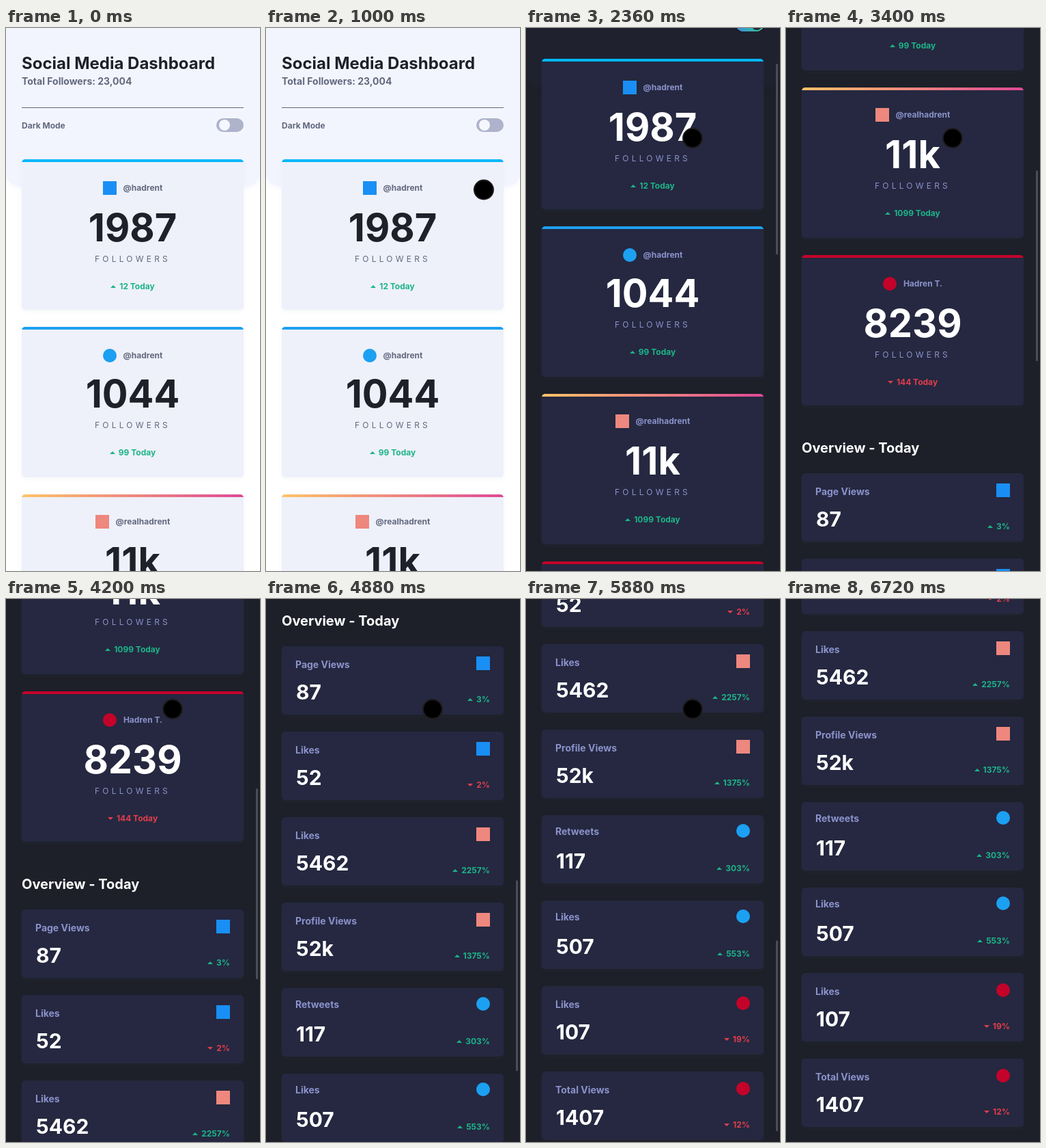
These frames come from a looping animation (372 px wide and 794 px high, 7200 ms). An HTML page:

```html
<!DOCTYPE html>
<html lang="en">
<head>
<meta charset="utf-8">
<title>Social Media Dashboard</title>
<style>
html, body { margin: 0; width: 100%; height: 100%; overflow: hidden; }
body { position: relative; background: var(--bg); font: 700 12px/20px Inter, sans-serif; color: var(--text); }
#page { position: absolute; top: 0; left: 0; width: 372px; height: 2243px; }
#page div, #page header, #cursor, #bar { position: absolute; box-sizing: border-box; }
header { width: 372px; height: 231px; border-radius: 0 0 20px 20px; background: var(--top); box-shadow: 0 2px 8px var(--top); }
#page .row { height: 20px; margin-top: -10px; display: flex; align-items: center; white-space: nowrap; }
.mid { left: 0; right: 0; justify-content: center; }
.strong { color: var(--strong); }
.up { color: #1db489; }
.down { color: #e23d4c; }
.row svg { width: 8px; height: 4px; margin-right: 5px; fill: currentColor; }
.down svg { transform: scaleY(-1); }
.card { left: 23px; width: 325px; border-radius: 5px; background: var(--card); box-shadow: 0 2px 6px rgba(90, 100, 150, .06); overflow: hidden; }
.stripe { top: 0; width: 100%; height: 4px; }
.row i { width: 20px; height: 20px; flex: none; }
.handle i { margin-right: 10px; }
.round { border-radius: 50%; }
.big { font-size: 56px; }
.spaced { font-weight: 400; letter-spacing: .35em; }
#line { left: 23px; top: 116px; width: 325px; height: 1px; background: var(--text); }
#toggle, #lit { width: 40px; height: 20px; border-radius: 10px; }
#toggle { left: 308px; top: 132px; background: #aeb3cb; }
#lit { background: linear-gradient(90deg, #378fe6, #35c884); }
#knob { left: 3.5px; top: 2px; width: 16px; height: 16px; border-radius: 50%; background: var(--knob); }
#cursor { left: -15px; top: -15px; width: 30px; height: 30px; border-radius: 50%; background: #000; border: 2px solid #1f1c1c; }
#bar { left: 366px; top: 1px; width: 3px; height: 279px; border-radius: 2px; background: #4b4d58; }
</style>
</head>
<body>
<div id="page">
  <header></header>
  <div class="row strong" style="left:23px;top:52px;font-size:24px">Social Media Dashboard</div>
  <div class="row" style="left:23px;top:78px;font-size:14px">Total Followers: 23,004</div>
  <div id="line"></div>
  <div class="row" style="left:23px;top:143px">Dark Mode</div>
  <div id="toggle"><div id="lit"></div><div id="knob"></div></div>
  <div class="row strong" style="left:23px;top:1209px;font-size:20px">Overview - Today</div>
</div>
<div id="bar"></div>
<div id="cursor"></div>
<script>
const $ = id => document.getElementById(id);
const LOOP = 7200;

// Plain shapes stand for the networks: [colour, class, stripe]
const nets = {
  f: ['#198ff5', '', '#00b7fa'],
  t: ['#1ca0f2', 'round', '#1ca0f2'],
  i: ['#ee877e', '', 'linear-gradient(90deg, #fdc468, #df4996)'],
  y: ['#c4032a', 'round', '#c4032a']
};
const icon = net => `<i class="${nets[net][1]}" style="background:${nets[net][0]}"></i>`;
const row = (y, cls, html, style = '') =>
  `<div class="row ${cls}" style="top:${y}px;${style}">${html}</div>`;
const change = (y, cls, n, text, style) => row(y, cls + (n < 0 ? ' down' : ' up'),
  `<svg viewBox="0 0 8 4"><path d="M0 4l4-4 4 4z"/></svg>${Math.abs(n)}${text}`, style);
const card = (y, h, html) => $('page').insertAdjacentHTML('beforeend',
  `<div class="card" style="top:${y}px;height:${h}px">${html}</div>`);

// network, handle, handle y, followers, change, shift of the lower rows
[['f', '@hadrent', 42, '1987', 12, 0],
 ['t', '@hadrent', 41.5, '1044', 99, -2],
 ['i', '@realhadrent', 40, '11k', 1099, -2],
 ['y', 'Hadren T.', 42, '8239', -144, 0]
].forEach(([net, name, y, count, n, dy], k) => card(192 + 245 * k, 220,
  `<div class="stripe" style="background:${nets[net][2]}"></div>` +
  row(y, 'mid handle', icon(net) + name) +
  row(100 + dy, 'mid strong big', count) +
  row(146 + dy, 'mid spaced', 'FOLLOWERS') +
  change(186 + dy, 'mid', n, ' Today')));

[['f', 'Page Views', '87', 3], ['f', 'Likes', '52', -2],
 ['i', 'Likes', '5462', 2257], ['i', 'Profile Views', '52k', 1375],
 ['t', 'Retweets', '117', 303], ['t', 'Likes', '507', 553],
 ['y', 'Likes', '107', -19], ['y', 'Total Views', '1407', -12]
].forEach(([net, label, count, n], k) => {
  const high = net === 't';
  card(1246 + 125 * k, 100,
    row(high ? 24 : 27, '', label, 'left:20px;font-size:14px') +
    row(high ? 23 : 25, '', icon(net), 'right:20px') +
    row(67, 'strong', count, 'left:21px;font-size:30px') +
    change(78, '', n, '%', 'right:20px'));
});

const clamp = x => Math.min(1, Math.max(0, x));
const ramp = (t, a, b) => clamp((t - a) / (b - a));
const ease = x => x * x * (3 - 2 * x);
const lerp = (a, b, p) => a + (b - a) * p;

// Smooth curve through [time, value] points, at rest at both ends
function curve(pts, t) {
  const last = pts.length - 1;
  if (t <= pts[0][0]) return pts[0][1];
  if (t >= pts[last][0]) return pts[last][1];
  const slope = k => k === 0 || k === last ? 0 :
    (pts[k + 1][1] - pts[k - 1][1]) / (pts[k + 1][0] - pts[k - 1][0]);
  const k = pts.findIndex(p => p[0] > t) - 1;
  const [t0, a] = pts[k], [t1, b] = pts[k + 1], d = t1 - t0, u = (t - t0) / d;
  return lerp(a, b, ease(u)) + d * u * (1 - u) * (slope(k) * (1 - u) - slope(k + 1) * u);
}
const scrollPath = [[2000, 0], [2360, 147], [3400, 595], [4200, 792], [5160, 1300], [6400, 1449]];

// light and dark value of each theme colour
const theme = {
  bg: [[255, 255, 255], [30, 32, 41]],
  top: [[243, 245, 254], [31, 33, 46]],
  card: [[238, 241, 250], [37, 40, 64]],
  text: [[99, 104, 126], [139, 146, 203]],
  strong: [[30, 32, 42], [255, 255, 255]],
  knob: [[245, 247, 255], [37, 40, 60]]
};

function draw(now) {
  const t = now % LOOP;
  const dark = ease(ramp(t, 1260, 1560));
  for (const name in theme) {
    const [a, b] = theme[name];
    document.body.style.setProperty('--' + name, `rgb(${a.map((v, k) => Math.round(lerp(v, b[k], dark)))})`);
  }
  $('lit').style.opacity = dark;
  $('knob').style.transform = `translateX(${18 * dark}px)`;

  const y = Math.round(curve(scrollPath, t));
  $('page').style.transform = `translateY(${-y}px)`;
  const fade = 1 - ramp(t, 6540, 6710);
  $('bar').style.opacity = t < 2000 ? 0 : fade;
  $('bar').style.transform = `translateY(${y * .3485}px)`;

  const go = ease(ramp(t, 480, 1160)), back = ease(ramp(t, 1320, 1720));
  const cx = lerp(lerp(250, 330, go), 244, back), cy = lerp(lerp(812, 144, go), 161, back);
  $('cursor').style.opacity = t < 480 ? 0 : fade;
  $('cursor').style.transform = `translate(${cx}px, ${cy}px)`;
  requestAnimationFrame(loop);
}
const start = performance.now();
const loop = () => draw(performance.now() - start);
loop();
</script>
</body>
</html>
```
